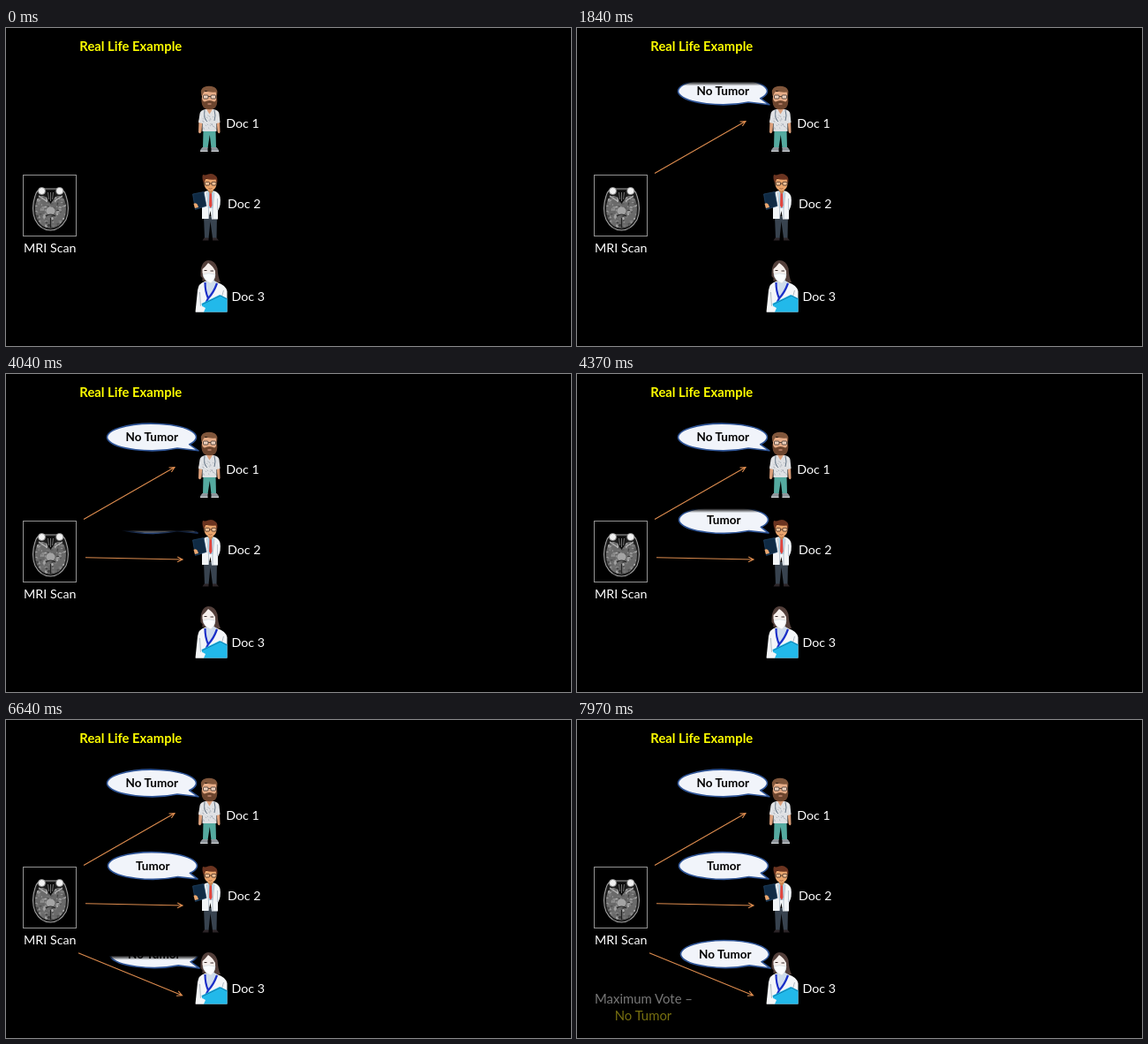
An HTML page that plays this animation: 640x360 px, repeating every 8 s.

```html
<!DOCTYPE html>
<html lang="en">
<head>
<meta charset="utf-8">
<title>Real Life Example</title>
<style>
html, body { margin: 0; width: 100%; height: 100%; overflow: hidden; background: #000; }
svg { display: block; width: 640px; height: 360px; }
text { font-family: Lato, "Open Sans", sans-serif; font-size: 14.3px; fill: #fff; text-anchor: middle; }
.title { font-size: 14.8px; font-weight: 700; fill: #ff0; }
.say { font-size: 13.5px; font-weight: 700; fill: #000; }
.vote { font-size: 14.9px; }
.bubble { fill: #f1f4fa; stroke: #2f5597; stroke-width: 1.6; stroke-linejoin: round; }
.arrow { fill: none; stroke: #dc8b4e; stroke-width: 1.1; }
</style>
</head>
<body>
<svg id="stage" viewBox="0 0 640 360">
  <defs>
    <clipPath id="brain"><path d="M35 194 Q40 187 46 192 L50 197 L55 192 Q61 187 66 194 Q70 205 66 216 Q60 226.500 50 226.500 Q40 226.500 35 216 Q31 205 35 194Z"/></clipPath>
  </defs>
  <rect width="640" height="360"/>
  <text class="title" x="141.3" y="26">Real Life Example</text>

  <!-- scan -->
  <rect x="19.5" y="166.5" width="60" height="69" stroke="#939393"/>
  <path d="M33 190 Q36 180 44 182 H57 Q65 180 68 190 Q73 205 68 217 Q61 229 50.500 229 Q39 229 33 217 Q28 205 33 190Z" fill="#1c1c1c" stroke="#a2a2a2" stroke-width="1.1"/>
  <g clip-path="url(#brain)">
    <rect x="30" y="185" width="42" height="44" fill="#6a6a6a"/>
    <g id="tissue"></g>
  </g>
  <path d="M46 184 H55 L54 194 L50.500 199 L47 194Z" fill="#0c0c0c"/>
  <path d="M50.500 186 V196 M47.500 186 L48.500 194 M53.500 186 L52.500 194" stroke="#8c8c8c" stroke-width=".8"/>
  <path d="M37 190 L46 196 M64 190 L55 196" stroke="#b5b5b5" stroke-width="1.4"/>
  <g fill="#f0f0f0" stroke="#8a8a8a" stroke-width=".8">
    <circle cx="40.500" cy="184.500" r="4"/><circle cx="60.800" cy="184.500" r="4"/>
  </g>
  <ellipse cx="50.500" cy="207" rx="5" ry="4.500" fill="#a4a4a4"/>
  <path d="M45 213 Q50.500 209 56 213 M50.500 215 V226" fill="none" stroke="#222" stroke-width="1.2"/>
  <text x="49.800" y="253.500">MRI Scan</text>

  <!-- doctor one -->
  <g>
    <path d="M223.500 115 H237.500 L238 136 H232.500 L230.800 121 L228.500 136 H223Z" fill="#55aaa0"/>
    <path d="M222.500 135 H228.500 V139.500 H220 Q219.500 138 222.500 135Z M232.500 135 H238.500 Q241.500 138 241 139.500 H232.500Z" fill="#8f969c"/>
    <path d="M220 139.500 H228.500 M232.500 139.500 H241" stroke="#d9dde0"/>
    <path d="M218.500 104 H222.500 L221.500 117 Q220 121 218 118Z M242 104 H238.500 L239.500 117 Q241 121 242.500 118Z" fill="#dda07b"/>
    <path d="M226 92 Q220 93 219.500 97 L218 107 L222.500 108 V117 H238.500 V108 L242.500 107 L241.500 97 Q241 93 235 92Z" fill="#dfe1e4"/>
    <path id="print" fill="none" stroke="#a4abb5" stroke-width=".9"/>
    <path d="M226.500 91 L230.500 97.500 L234.500 91Z" fill="#dda07b"/>
    <path d="M225 93 Q223.500 103 228 106 M236 93 Q238 99 236 105" fill="none" stroke="#56697c" stroke-width=".9"/>
    <path d="M222 72 H238.500 V82 Q237 90 230.500 91 Q223.500 90 222 82Z" fill="#e7ad88"/>
    <path d="M221.500 78 Q222.500 83 225 83.500 Q230.500 80.500 236 83.500 Q238 83 239 78 Q240.500 89 235 91.500 Q230.500 93 226 91.500 Q220.500 89 221.500 78Z" fill="#6c452e"/>
    <path d="M228.500 86 H232.500" stroke="#d89880" stroke-width="1.200"/>
    <path d="M221.500 77 Q219.500 69 224 67 Q230 64.500 236 67 Q240.500 69 239 77 L237.500 72.500 Q231 73.500 226 71 Q223 73 222.500 76Z" fill="#80563b"/>
    <g fill="#edd0bd" stroke="#3a302c" stroke-width=".8">
      <rect x="223.500" y="76" width="5.500" height="4" rx="1"/><rect x="232" y="76" width="5.500" height="4" rx="1"/>
      <path d="M229 77.500 H232"/>
    </g>
  </g>
  <text x="268" y="112.500">Doc 1</text>

  <!-- doctor two -->
  <g>
    <path d="M224 213 H239 L238.500 238 H234 L231.500 219 L229.500 238 H225Z" fill="#38434f"/>
    <path d="M224.500 237.500 H229.500 V240.500 H222.500Z M234 237.500 H238.500 L241 240.500 H234Z" fill="#2c2528"/>
    <path d="M227 184.500 Q222 186 222 192 V216 H229.500 L231.500 207 L233 216.500 H240 V207 Q244 200 242.500 191 Q241 186 236 184.500Z" fill="#f2f5f7"/>
    <path d="M228.500 184 H235 L234 204 H229.500Z" fill="#a6d3ea"/>
    <path d="M230.500 186 H233 L233.500 201 L231.800 204 L230 201Z" fill="#e2443c"/>
    <path d="M227.500 186 L229.500 205 V216 M236 186 L234 205 V216 M239.500 193 V206" fill="none" stroke="#aab5c0" stroke-width=".8"/>
    <path d="M211.500 188 L224 185.500 L227 201.500 L214.500 205.500Z" fill="#0f2a44" stroke="#24486a" stroke-width=".7"/>
    <path d="M212.500 199 Q215 197 217 200 L218 203 L214 204Z" fill="#eaa66e"/>
    <path d="M229 180 H234.500 V185 L232 188 L229 185Z" fill="#c98552"/>
    <path d="M224.500 171 H238.500 V177 Q237.500 183.500 231.500 184.500 Q225.500 183.500 224.500 177Z" fill="#eaa66e"/>
    <path d="M224 176 Q221.500 169 223 166 Q226 167 229 165.500 Q234 164 237 167 Q240.500 169 239 176 L237.500 171.500 Q231 172.500 226.500 170.500Z" fill="#6b3420"/>
    <g fill="#f1c096" stroke="#402a20" stroke-width=".8">
      <rect x="225.500" y="174.300" width="5" height="3.800" rx="1"/><rect x="233" y="174.300" width="5" height="3.800" rx="1"/>
      <path d="M230.500 176 H233"/>
    </g>
    <path d="M229.500 181.500 Q231.500 182.800 233.500 181.500" fill="none" stroke="#9b5a3c" stroke-width=".8"/>
  </g>
  <text x="269.800" y="203.500">Doc 2</text>

  <g id="moves"></g>

  <!-- doctor three -->
  <g>
    <path d="M220.500 281 Q220 264 229 263 Q237 263 239.500 272 Q240 282 243 288 L236 289 L222 286 Q224 284 220.500 281Z" fill="#54403b"/>
    <path d="M225 287 Q218 289 217 297 L214.500 321.500 H250.500 V298 Q249 291 239 288 L233 285Z" fill="#f4f6f8"/>
    <path d="M226 287 L230 308 L239 288 L234 285Z" fill="#cfdcec"/>
    <path d="M222.500 273 Q226 270 229 266 Q234 269 237 275 Q238 284 232.500 289 Q224 287 222.500 277Z" fill="#f6efec"/>
    <path d="M223 279 Q229 276.500 237 279 Q236.500 286 232 289 Q224.500 286 223 279Z" fill="#fbfcfd" stroke="#ccd3da" stroke-width=".6"/>
    <path d="M224.500 274.500 H227.500 M231.500 275 H235" stroke="#3a2c2a" stroke-width="1.200"/>
    <path d="M225.500 288 Q225.500 298 229 306 Q235 300 239 289 M229 306 L225.500 313" fill="none" stroke="#1a2fc8" stroke-width="2.200"/>
    <path d="M219.500 299 L220.500 316 M246.500 297 L244.500 304" stroke="#aab4be" stroke-width=".9"/>
    <path d="M221.500 312 L242 302 L250.500 306 V321.500 H223.500Z" fill="#22b9ea"/>
    <path d="M222 313 L243 303 L250.500 307" fill="none" stroke="#0f7fae" stroke-width="1"/>
    <path d="M215 316 Q221 313 226 317 L224 321.500 H215Z" fill="#f4f6f8"/>
  </g>
  <text x="274.300" y="309">Doc 3</text>

  <g id="verdict" opacity="0">
    <text class="vote" x="75.500" y="320.500">Maximum Vote –</text>
    <text class="vote" x="75" y="339.500" style="fill:#ffee22">No Tumor</text>
  </g>
</svg>
<script>
const LOOP = 8000, STEP = 200 / 3, WIPE = 510;
const $ = id => document.getElementById(id);
const clamp = v => Math.max(0, Math.min(1, v));

function add(parent, tag, attrs, text) {
  const el = document.createElementNS('http://www.w3.org/2000/svg', tag);
  for (const k in attrs) el.setAttribute(k, attrs[k]);
  if (text) el.textContent = text;
  return parent.appendChild(el);
}

const wipes = [];

// A group revealed by a soft edge travelling from a to b along one axis.
function wipe(start, axis, a, b, soft) {
  const id = 'wipe' + wipes.length, dir = Math.sign(b - a);
  const defs = document.querySelector('defs');
  const grad = add(defs, 'linearGradient', { id: id + 'g', gradientUnits: 'userSpaceOnUse', x1: 0, y1: 0, x2: 0, y2: 0 });
  add(grad, 'stop', { offset: 0, 'stop-color': '#fff' });
  add(grad, 'stop', { offset: 1, 'stop-color': '#fff', 'stop-opacity': 0 });
  const box = { x: 0, y: 0, width: 640, height: 360 };
  const mask = add(defs, 'mask', { id, maskUnits: 'userSpaceOnUse', ...box });
  add(mask, 'rect', { ...box, fill: `url(#${id}g)` });
  const group = add($('moves'), 'g', { mask: `url(#${id})` });
  wipes.push(t => {
    const p = clamp((t - start) / WIPE);
    const edge = a - dir * soft + (b - a + dir * soft) * p;
    group.setAttribute('visibility', p > 0 ? 'visible' : 'hidden');
    grad.setAttribute(axis + '1', edge);
    grad.setAttribute(axis + '2', edge + dir * soft);
  });
  return group;
}

function arrow(start, x1, y1, x2, y2) {
  const ang = Math.atan2(y2 - y1, x2 - x1);
  const barb = s => `${x2 - 6.5 * Math.cos(ang + s)} ${y2 - 6.5 * Math.sin(ang + s)}`;
  add(wipe(start, 'x', x1 - 1, x2 + 1, 12), 'path', {
    class: 'arrow',
    d: `M${x1} ${y1} L${x2} ${y2} M${barb(0.46)} L${x2} ${y2} L${barb(-0.46)}`
  });
}

function bubble(start, cx, cy, rx, ry, tx, ty, label) {
  const g = wipe(start, 'y', cy + ry + 1, cy - ry - 1, 5);
  const ang = Math.atan2((ty - cy) / ry, (tx - cx) / rx);
  const at = s => `${cx + rx * Math.cos(ang + s)} ${cy + ry * Math.sin(ang + s)}`;
  add(g, 'path', { class: 'bubble', d: `M${tx} ${ty} L${at(0.196)} A${rx} ${ry} 0 1 1 ${at(-0.196)}Z` });
  add(g, 'text', { class: 'say', x: cx + 0.3, y: cy + 4.8 }, label);
}

// Seeded grain for the scan and the shirt print.
let seed = 11;
const rnd = () => (seed = (seed * 16807) % 2147483647) / 2147483647;
for (let i = 0; i < 150; i++) {
  const shade = 55 + Math.floor(rnd() * 130);
  add($('tissue'), 'ellipse', {
    cx: 31 + rnd() * 39, cy: 189 + rnd() * 39, rx: 0.5 + rnd() * 1.4, ry: 0.5 + rnd() * 1.2,
    fill: `rgb(${shade},${shade},${shade})`
  });
}
let print = '';
for (let i = 0; i < 24; i++) print += `M${222 + rnd() * 15} ${97 + rnd() * 18}l1.2 .8`;
$('print').setAttribute('d', print);

arrow(455, 88, 164.5, 191, 105.6);
bubble(1464, 165, 71.5, 50.5, 15.3, 218, 86.8, 'No Tumor');
arrow(2925, 90, 207.8, 200, 210);
bubble(3972, 166, 165, 50.5, 15.3, 217, 180, 'Tumor');
arrow(5458, 82, 263.7, 199.5, 311.8);
bubble(6434, 167.5, 265, 50, 15.5, 219, 281, 'No Tumor');

function draw(t) {
  // 15 pictures a second; the small lead absorbs clock rounding
  const q = 500 + Math.floor((t - 499) / STEP) * STEP;
  wipes.forEach(set => set(q));
  $('verdict').setAttribute('opacity', clamp((q - 7500) / 1000));
}

let origin;
function frame(now) {
  if (origin === undefined) origin = now;
  draw((now - origin) % LOOP);
  requestAnimationFrame(frame);
}
draw(0);
requestAnimationFrame(frame);
</script>
</body>
</html>
```
